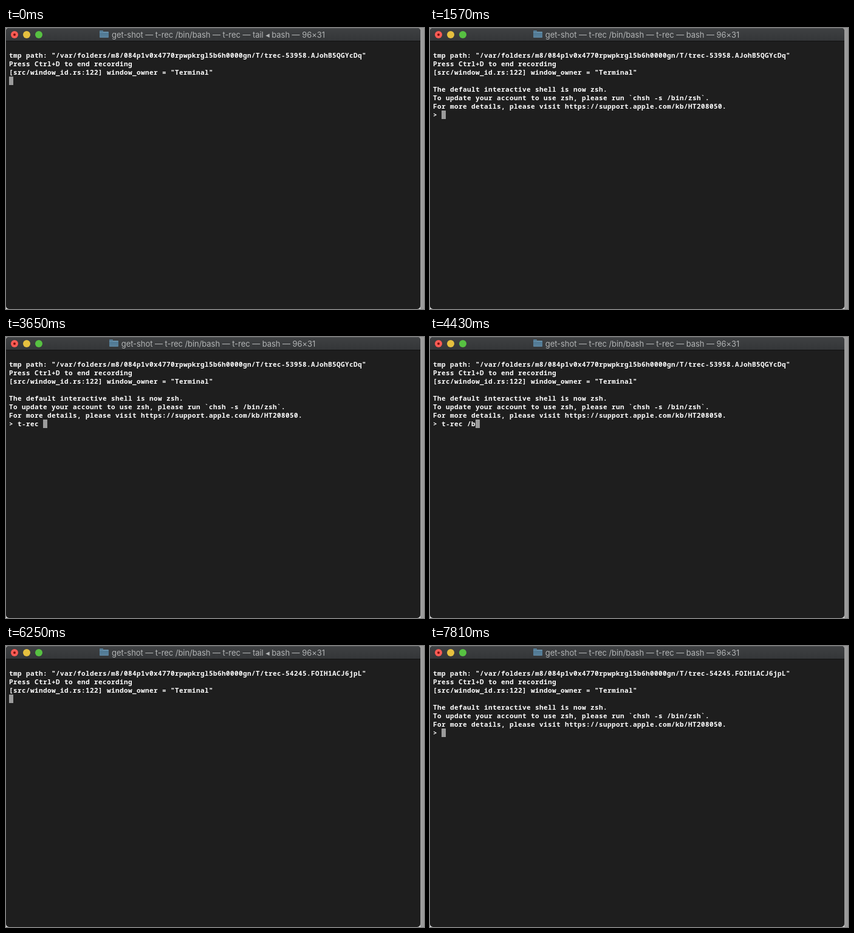
Recreate the animation shown at these times as an HTML page. Size 688 by 463 pixels, loop 8 s.

```html
<!DOCTYPE html>
<html lang="en">
<head>
<meta charset="utf-8">
<title>Terminal recording</title>
<style>
  html, body { margin: 0; width: 688px; height: 463px; overflow: hidden; }
  body { background: linear-gradient(90deg, transparent 682px, #9b9b9b 682px), linear-gradient(#9b9b9b 50%, #e4e4e4 50%); }
  #window {
    position: absolute; left: 0; top: 0; width: 682px; height: 463px;
    overflow: hidden; border-radius: 5px; background: #1e1e1e;
  }
  #bar {
    position: absolute; left: 0; top: 0; width: 682px; height: 22px; box-sizing: border-box;
    background: linear-gradient(#3e4042, #343638);
    border-top: 1px solid #55585a; border-bottom: 1px solid #111;
  }
  #bar svg { position: absolute; left: 0; top: -1px; }
  #caption {
    position: absolute; left: 0; top: 0; width: 679px; height: 20px;
    display: flex; justify-content: center; align-items: center;
    color: #b2b4b5; font: 13px/20px Inter, "DejaVu Sans", sans-serif;
    letter-spacing: -0.06px; white-space: pre;
  }
  #caption i { position: relative; width: 15px; height: 10px; margin-right: 5px; border-radius: 1px; background: linear-gradient(#6790aa 2px, #4f7893 2px, #5b829c); }
  #caption i::before { content: ""; position: absolute; left: 0; top: -2px; width: 6px; height: 3px; border-radius: 1px; background: #537b95; }
  #screen {
    position: absolute; left: 5px; top: 38px; margin: 0; color: #fff;
    font: 600 11px/14px "Noto Sans Mono", "DejaVu Sans Mono", monospace;
    letter-spacing: calc(7px - 1ch); font-variant-ligatures: none;
  }
  #cursor { position: absolute; width: 7px; height: 14px; background: #9b9b9b; }
</style>
</head>
<body>
<div id="window">
  <div id="bar">
    <svg width="70" height="22">
      <circle cx="14" cy="11" r="6" fill="#fc5b54"/>
      <circle cx="14" cy="11" r="2" fill="#7a100c"/>
      <circle cx="34" cy="11" r="6" fill="#e6c03f"/>
      <circle cx="54" cy="11" r="6" fill="#57c142"/>
    </svg>
    <div id="caption"><i></i><span id="title"></span></div>
  </div>
  <pre id="screen"></pre>
  <div id="cursor"></div>
</div>
<script>
const LOOP = 8000;
const command = "t-rec /bin/bash";
// [time, number of characters typed]
const keys = [
  [2090, 1], [2610, 2], [2870, 4], [3130, 5], [3650, 6], [3910, 7], [4430, 8],
  [4690, 10], [4950, 11], [5220, 12], [5480, 14], [5740, 15]
];
const notice = [
  "",
  "The default interactive shell is now zsh.",
  "To update your account to use zsh, please run `chsh -s /bin/zsh`.",
  "For more details, please visit https://support.apple.com/kb/HT208050."
];
const el = id => document.getElementById(id);

function setText(id, text) {
  if (el(id).textContent !== text) el(id).textContent = text;
}

function draw(now) {
  const t = now % LOOP;
  const second = t >= 6250;
  const age = second ? t - 6250 : t;
  const ready = age >= (second ? 520 : 530);
  const process = ready ? "bash" : age < (second ? 260 : 250) ? "tail ◂ bash" : "bash ◂ bash";
  const session = second ? "54245.FOIH1ACJ6jpL" : "53958.AJohB5QGYcDq";
  const lines = [
    `tmp path: "/var/folders/m8/084p1v0x4770rpwpkrgl5b6h0000gn/T/trec-${session}"`,
    "Press Ctrl+D to end recording",
    '[src/window_id.rs:122] window_owner = "Terminal"'
  ];
  let prompt = "";
  if (ready) {
    const typed = second ? 0 : keys.reduce((n, [at, count]) => t >= at ? count : n, 0);
    prompt = "> " + command.slice(0, typed);
    lines.push(...notice);
  }
  lines.push(prompt);

  setText("title", `get-shot — t-rec /bin/bash — t-rec — ${process} — 96×31`);
  setText("screen", lines.join("\n"));
  el("cursor").style.left = 5 + 7 * prompt.length + "px";
  el("cursor").style.top = 38 + 14 * (lines.length - 1) + "px";
}

const start = performance.now();
function tick() {
  draw(performance.now() - start);
  requestAnimationFrame(tick);
}
draw(0);
requestAnimationFrame(tick);
</script>
</body>
</html>
```
